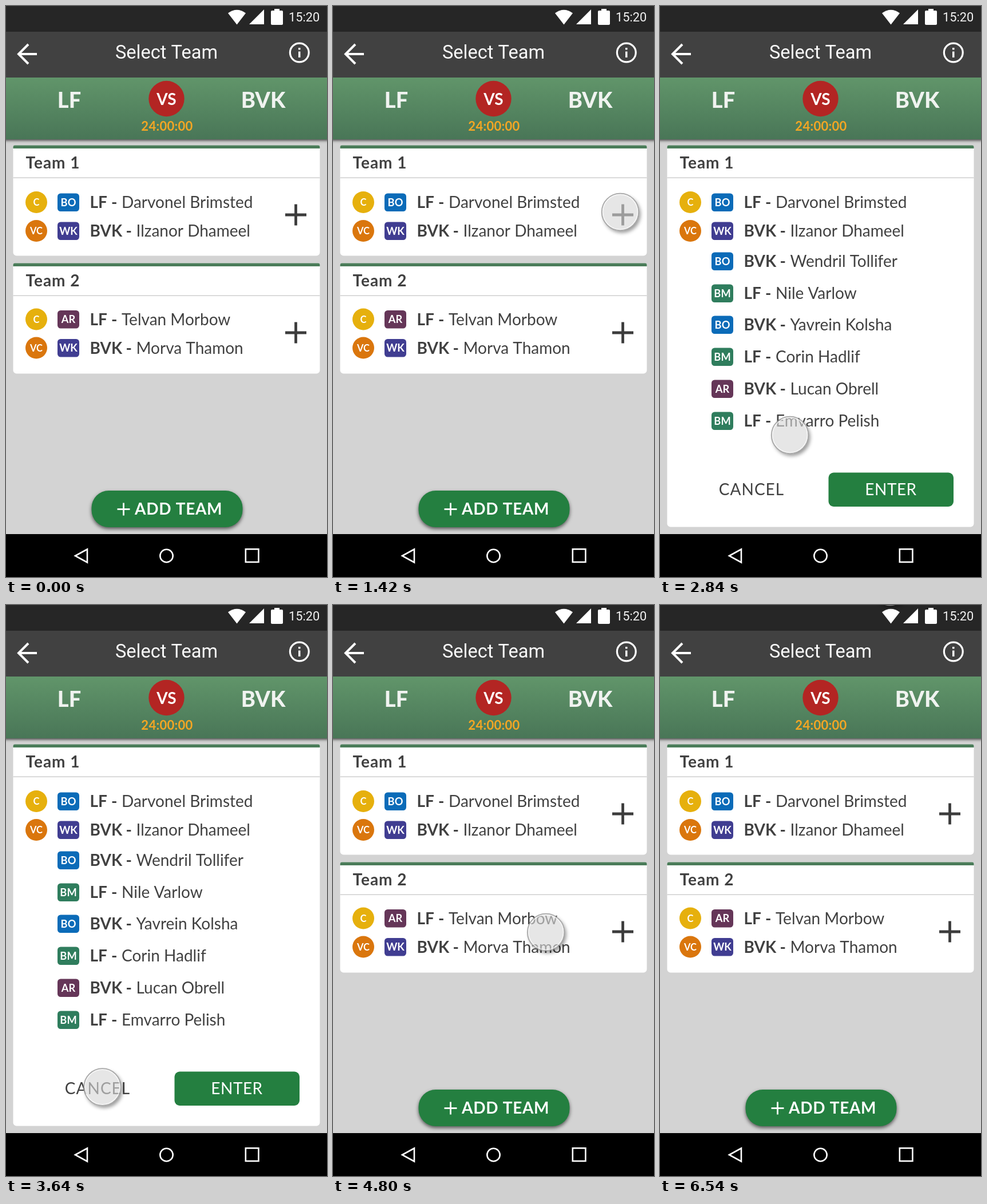
An HTML page with a canvas for the animation above (6680 ms loop, 561 by 998 pixels).

```html
<!DOCTYPE html>
<html lang="en">
<head>
<meta charset="utf-8">
<title>Select Team</title>
<style>
  html, body { margin: 0; width: 100%; height: 100%; overflow: hidden; background: #d3d3d3; }
  canvas { display: block; width: 561px; height: 998px; }
</style>
</head>
<body>
<canvas id="stage" width="561" height="998"></canvas>
<script>
const W = 561, H = 998, LOOP = 6680;
const INK = '#414141', GREEN = '#247f40';
const SANS = 'Lato, sans-serif', ROBOTO = 'Roboto, sans-serif';
const BADGES = { BO: '#0b6bb8', WK: '#403d91', AR: '#653658', BM: '#2f7d5d' };
const HOME = 'LF', AWAY = 'BVK';

// --- drawing helpers ---
function text(c, str, x, y, size, { weight = 400, color = INK, align = 'left', gap = 0, family = SANS } = {}) {
  c.font = `${weight} ${size}px ${family}`;
  c.fillStyle = color;
  c.textAlign = align;
  c.letterSpacing = gap + 'px';
  c.fillText(str, x, y);
}

function box(c, x, y, w, h, radius, color) {
  c.fillStyle = color;
  c.beginPath();
  c.roundRect(x, y, w, h, radius);
  c.fill();
}

function disc(c, x, y, r, color) {
  c.fillStyle = color;
  c.beginPath();
  c.arc(x, y, r, 0, 7);
  c.fill();
}

function ring(c, x, y, r, width, color) {
  c.strokeStyle = color;
  c.lineWidth = width;
  c.beginPath();
  c.arc(x, y, r, 0, 7);
  c.stroke();
}

function line(c, points, width, color, close) {
  c.strokeStyle = color;
  c.lineWidth = width;
  c.beginPath();
  points.forEach(p => c.lineTo(...p));
  if (close) c.closePath();
  c.stroke();
}

function plus(c, x, y, arm, width, color) {
  line(c, [[x - arm, y], [x + arm, y]], width, color);
  line(c, [[x, y - arm], [x, y + arm]], width, color);
}

function withShadow(c, dx, dy, blur, color, draw) {
  c.save();
  c.shadowOffsetX = dx;
  c.shadowOffsetY = dy;
  c.shadowBlur = blur;
  c.shadowColor = color;
  draw();
  c.restore();
}

// --- interface parts ---
function statusBar(c) {
  c.fillStyle = '#262626';
  c.fillRect(0, 0, W, 45);
  c.fillStyle = '#fff';
  c.beginPath();
  c.moveTo(403.5, 32.5);
  c.lineTo(388, 12.5);
  c.quadraticCurveTo(403.5, 1, 419, 12.5);
  c.fill();
  c.beginPath();
  c.moveTo(425, 32);
  c.lineTo(451, 32);
  c.lineTo(451, 6);
  c.fill();
  box(c, 463, 8, 21, 25, 2, '#fff');
  c.fillRect(469, 5, 9, 4);
  text(c, '15:20', 494, 26.5, 21.8, { color: '#f2f2f2', family: ROBOTO });
}

function appBar(c) {
  c.fillStyle = '#414141';
  c.fillRect(0, 45, W, 80);
  line(c, [[54, 84], [22, 84]], 4, '#fff');
  line(c, [[39, 67], [22, 84], [39, 101]], 4, '#fff');
  text(c, 'Select Team', 280.5, 92, 32.6, { color: '#fafafa', align: 'center', family: ROBOTO });
  ring(c, 512.8, 81.5, 16.4, 3.2, '#fff');
  c.fillStyle = '#fff';
  c.fillRect(511, 73, 3.5, 3.5);
  c.fillRect(511, 79.5, 3.5, 10.5);
}

function matchBar(c) {
  withShadow(c, 0, 2, 5, 'rgba(0,0,0,.7)', () => {
    const g = c.createLinearGradient(0, 125, 0, 233);
    g.addColorStop(0, '#61956a');
    g.addColorStop(1, '#497657');
    c.fillStyle = g;
    c.fillRect(-10, 125, W + 20, 108);
  });
  const name = { weight: 800, color: '#f0f3f0', align: 'center' };
  text(c, HOME, 110.5, 178, 38, name);
  text(c, AWAY, 449.5, 178, 38, name);
  disc(c, 280.5, 162, 31.2, '#b32523');
  text(c, 'VS', 280.5, 172.5, 28, { weight: 700, color: '#fff', align: 'center' });
  text(c, '24:00:00', 281.5, 218, 22, { weight: 700, color: '#f5a623', align: 'center', gap: .3 });
}

function navBar(c) {
  c.fillStyle = '#000';
  c.fillRect(0, 923, W, 75);
  line(c, [[121, 961], [142, 949.5], [142, 972.5]], 2.6, '#fff', true);
  ring(c, 280.5, 961, 11.2, 2.6, '#fff');
  c.strokeRect(418.8, 949.3, 22.6, 22.6);
}

function card(c, title, top, bottom) {
  box(c, 12.5, top + .5, 536, bottom - top - .5, [3, 3, 6, 6], '#fff');
  box(c, 12.5, top + .5, 536, 5.5, [3, 3, 0, 0], '#4a7c59');
  c.fillStyle = '#cfcfcf';
  c.fillRect(12.5, top + 56.5, 536, 1.5);
  text(c, title, 34.5, top + 41, 28, { weight: 700, gap: 1 });
}

function player(c, y, role, team, name, rank) {
  const label = { weight: 700, color: '#fff', align: 'center' };
  if (rank) {
    disc(c, 53, y, 19, rank === 'C' ? '#e6b00d' : '#da760d');
    text(c, rank, 53, y + 6, 16.5, label);
  }
  box(c, 90, y - 15.5, 38, 31.5, 5.5, BADGES[role]);
  text(c, role, 109, y + 6.5, 18.3, label);
  const nameX = team === HOME ? 202 : 227.5;
  text(c, team, 146.5, y + 10, 28, { weight: 700 });
  text(c, '-', nameX - 7.5, y + 10, 28, { weight: 700, align: 'right' });
  text(c, name, nameX, y + 10, 28);
}

function firstTeam(c, bottom) {
  card(c, 'Team 1', 243, bottom);
  player(c, 343, 'BO', HOME, 'Darvonel Brimsted', 'C');
  player(c, 393, 'WK', AWAY, 'Ilzanor Dhameel', 'VC');
}

function listBody(c) {
  firstTeam(c, 436.5);
  plus(c, 506.5, 365, 18.5, 4.8, '#3c3c3c');
  card(c, 'Team 2', 449, 642.5);
  player(c, 547.5, 'AR', HOME, 'Telvan Morbow', 'C');
  player(c, 597.5, 'WK', AWAY, 'Morva Thamon', 'VC');
  plus(c, 506.5, 571, 18.5, 4.8, '#3c3c3c');
  withShadow(c, 0, 3, 6, 'rgba(0,0,0,.6)', () => box(c, 149.5, 847, 264, 64, 30, GREEN));
  plus(c, 205.5, 879.5, 11, 2.8, '#fff');
  text(c, 'ADD TEAM', 225, 889, 28, { weight: 700, color: '#fff', gap: .7 });
}

function detailBody(c) {
  firstTeam(c, 910.5);
  player(c, 446, 'BO', AWAY, 'Wendril Tollifer');
  player(c, 502, 'BM', HOME, 'Nile Varlow');
  player(c, 557, 'BO', AWAY, 'Yavrein Kolsha');
  player(c, 613, 'BM', HOME, 'Corin Hadlif');
  player(c, 669, 'AR', AWAY, 'Lucan Obrell');
  player(c, 725, 'BM', HOME, 'Emvarro Pelish');
  text(c, 'CANCEL', 160, 854.5, 28, { align: 'center', gap: 1 });
  box(c, 294.5, 815.5, 218.5, 59.5, 9, GREEN);
  text(c, 'ENTER', 403.5, 854.5, 28, { color: '#fff', align: 'center', gap: .5 });
}

function screen(body) {
  const cv = document.createElement('canvas');
  cv.width = W;
  cv.height = H;
  const c = cv.getContext('2d');
  c.fillStyle = '#d3d3d3';
  c.fillRect(0, 0, W, H);
  body(c);
  matchBar(c);
  appBar(c);
  statusBar(c);
  navBar(c);
  return cv;
}

function touch(c, x, y) {
  c.save();
  c.beginPath();
  c.rect(0, 0, W, H);
  c.arc(x, y, 33, 0, 7);
  c.clip('evenodd');
  withShadow(c, 3, 4, 6, 'rgba(0,0,0,.4)', () => disc(c, x, y, 32.5, '#999'));
  c.restore();
  disc(c, x, y, 32, 'rgba(215,215,215,.62)');
  ring(c, x, y, 30.5, 1.6, 'rgba(255,255,255,.7)');
  ring(c, x, y, 32.3, 1.8, 'rgba(155,155,155,.85)');
}

// --- motion ---
const clamp = v => Math.min(1, Math.max(0, v));
const curve = (s, a, b) => 3 * s * (1 - s) ** 2 * a + 3 * s * s * (1 - s) * b + s ** 3;

// cubic-bezier(.25, .1, .25, 1)
function ease(t) {
  let lo = 0, hi = 1;
  for (let i = 0; i < 24; i++) {
    const mid = (lo + hi) / 2;
    if (curve(mid, .25, .25) < t) lo = mid; else hi = mid;
  }
  return curve(lo, .1, 1);
}

// out and back: how far the path bends near its start and its end
const MOVES = [
  { at: 125, span: 900, from: [416, -40], to: [502, 360], out: [0, 0], back: [0, 0] },
  { at: 2160, span: 1320, from: [502, 360], to: [168.5, 842.5], out: [-27, -56], back: [0, 0] },
  { at: 4430, span: 1090, from: [168.5, 842.5], to: [503.5, 374.5], out: [22, 16], back: [0, 0] },
  { at: 5670, span: 870, from: [503.5, 374.5], to: [402, -32], out: [-91, 0], back: [-91, 0] }
];

function touchAt(t) {
  const m = MOVES.filter(v => v.at <= t).pop() || MOVES[0];
  const p = ease(clamp((t - m.at) / m.span));
  const bendOut = 3 * p * (1 - p) ** 2, bendBack = 3 * p * p * (1 - p);
  return [0, 1].map(i => m.from[i] + (m.to[i] - m.from[i]) * p + m.out[i] * bendOut + m.back[i] * bendBack);
}

const stage = document.getElementById('stage').getContext('2d');
const list = screen(listBody), detail = screen(detailBody);

function render(t) {
  const open = clamp((t - 1440) / 280) - clamp((t - 4050) / 300);
  stage.drawImage(list, 0, 0);
  stage.globalAlpha = open;
  stage.drawImage(detail, 0, 0);
  stage.globalAlpha = 1;
  if (t >= 140) touch(stage, ...touchAt(t));
}

const start = performance.now();
function tick() {
  render((performance.now() - start) % LOOP);
  requestAnimationFrame(tick);
}
tick();
</script>
</body>
</html>
```
